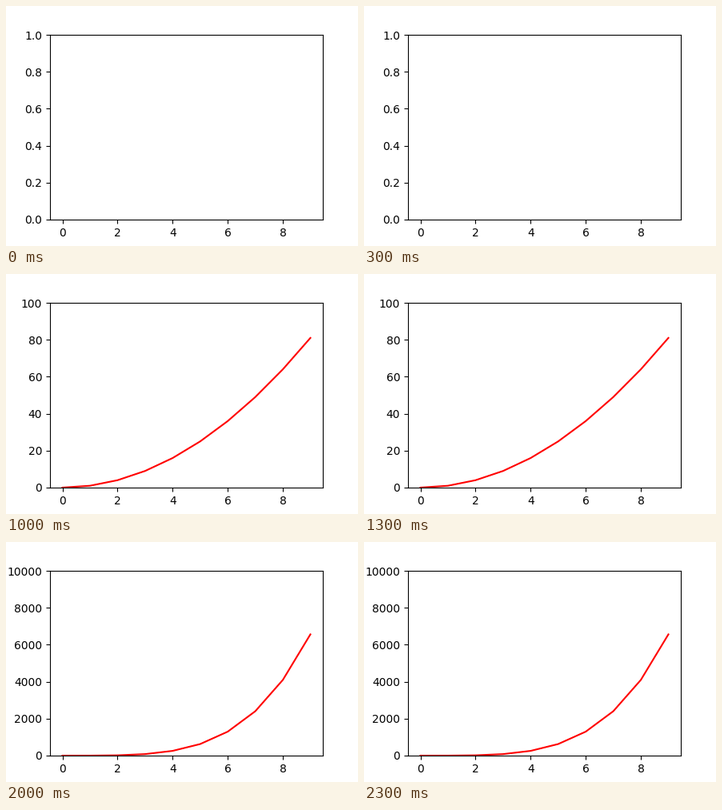
Animation of 440 by 300 pixels, one loop 2500 ms. Source, as a matplotlib script:

```python
import numpy as np
import matplotlib.pyplot as plt
from matplotlib.animation import FuncAnimation

DPI = 100
POWERS = 5

x = np.arange(10)

fig, ax = plt.subplots(figsize=(440 / DPI, 300 / DPI), dpi=DPI)
line, = ax.plot([], [], color="red", linewidth=1.5)
ax.set_xlim(-0.45, 9.45)


def update(power):
    """Show x**power on a scale of 0 to 10**power; power 0 leaves the plot empty."""
    if power:
        line.set_data(x, x ** power)
    else:
        line.set_data([], [])
    ax.set_ylim(0, 10 ** power)
    return line,


def reset():
    return update(0)


anim = FuncAnimation(fig, update, frames=POWERS, init_func=reset,
                     interval=500, repeat=True, repeat_delay=0, blit=False)

plt.show()
```
